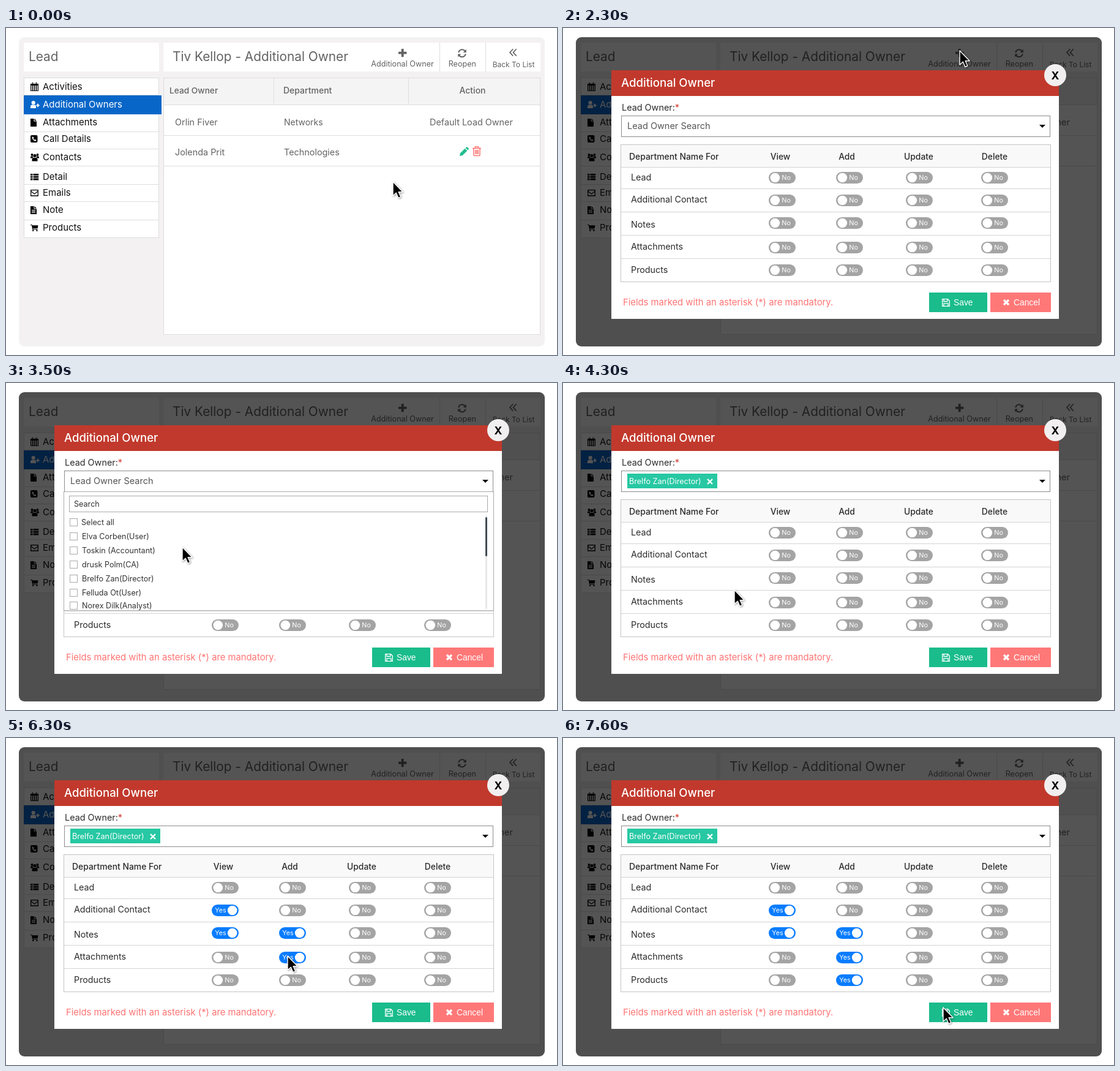
Animation, 900 px wide and 534 px high, one loop 8000 ms. Source, as an HTML page:

```html
<!DOCTYPE html>
<html lang="en">
<head>
<meta charset="utf-8">
<title>Additional owner</title>
<style>
  html, body { margin: 0; width: 100%; height: 100%; overflow: hidden; background: #fff; }
  svg { display: block; width: 100%; height: 100%; font-family: Inter, "Open Sans", sans-serif; }
</style>
</head>
<body>
<svg id="stage" viewBox="0 0 900 534"></svg>
<script>
const LOOP = 8000, STEP = 100;
const GREY = '#636363', INK = '#2b2b2b', LINE = '#dedede', GREEN = '#1abc8c', CORAL = '#ff7878';

const rect = (x, y, w, h, fill, attrs = '') =>
  `<rect x="${x}" y="${y}" width="${w}" height="${h}" fill="${fill}" ${attrs}/>`;
// A box whose one-pixel border lies inside the given bounds.
const box = (x, y, w, h, fill, stroke) =>
  rect(x + .5, y + .5, w - 1, h - 1, fill, `stroke="${stroke}"`);
const text = (x, y, str, size, fill = INK, attrs = '') =>
  `<text x="${x}" y="${y}" font-size="${size}" fill="${fill}" ${attrs}>${str}</text>`;
const centred = (x, y, str, size, fill, attrs = '') =>
  text(x, y, str, size, fill, `text-anchor="middle" ${attrs}`);
const icon = (x, y, d, fill = '#000') =>
  `<path transform="translate(${x} ${y})" d="${d}" fill="${fill}" fill-rule="evenodd"/>`;
const outline = (x, y, d, stroke = '#000', width = 1.3) =>
  `<path transform="translate(${x} ${y})" d="${d}" fill="none" stroke="${stroke}" stroke-width="${width}"/>`;
const during = (from, to, markup) => `<g data-from="${from}" data-to="${to}">${markup}</g>`;
const MEDIUM = 'font-weight="500"';

const dot = (x, y, r) => `M${x - r} ${y}a${r} ${r} 0 1 0 ${2 * r} 0a${r} ${r} 0 1 0 ${-2 * r} 0z`;
const cells = [5.2, 8, 10.8].flatMap(y => [1, 4, 7, 10].map(x => `M${x} ${y}h2v2h-2z`)).join('');
const sheet = 'M1 0H6.5V4.5H11V13H1ZM7.5 0L11 3.5H7.5Z';
const cross = 'M1 1L9 9M9 1L1 9';

// Menu entries: label, vertical centre, icon
const menu = [
  ['Activities', 96, icon(40, 89, 'M0 2H13V14H0ZM2.5 0h2v1.5h-2zM8.5 0h2v1.5h-2z' + cells)],
  ['Additional Owners', 125, icon(40, 118, dot(4.7, 4, 3.1) +
    'M0 13V10.5Q0 7.6 3 7.6H6.5Q9 7.6 9 10.5V13ZM11 5.5h1.8v2h2v1.8h-2v2H11v-2H9.3V7.5H11Z', '#fff')],
  ['Attachments', 154, icon(39, 148, sheet)],
  ['Call Details', 181, icon(40, 174, 'M2 1H9.5Q11.5 1 11.5 3V11Q11.5 13 9.5 13H2Q0 13 0 11V3Q0 1 2 1Z' +
    'M4 3.2L2.5 4.5Q3.5 9.5 8 11L9.5 9.3L7.6 7.8L6.7 8.8Q5 7.8 4.6 6.2L5.5 5.2Z')],
  ['Contacts', 211, icon(40, 204, dot(2.5, 3, 1.9) + dot(11.5, 3, 1.9) + dot(7, 4.6, 2.6) +
    'M0 8.5V7Q0 5.3 2 5.3H3.5L4.5 7.6L3 8.5ZM14 8.5V7Q14 5.3 12 5.3H10.5L9.5 7.6L11 8.5Z' +
    'M2.5 13.5V11Q2.5 8 5 8H9Q11.5 8 11.5 11V13.5Z')],
  ['Detail', 243, icon(40, 236, [2, 5.8, 9.6].map(y => `M0 ${y}h3.5v2.8H0zM4.6 ${y}h8.6v2.8H4.6z`).join(''))],
  ['Emails', 269, outline(40, 262, 'M.7 2.7H12.3V12H.7ZM.7 4.5L6.5 9L12.3 4.5')],
  ['Note', 297, icon(39, 291, sheet + 'M3 6h6v1H3zM3 8h6v1H3zM3 10h6v1H3z')],
  ['Products', 326, icon(40, 319, 'M0 2H2.5L3 3.2H12.5L11.6 8.2H4L4.2 9.2H11.5V10.3H3.3L1.8 3H0Z' +
    dot(4.2, 11.8, 1.2) + dot(10.5, 11.8, 1.2))],
];

const page = () => [
  rect(21, 15, 859, 505, '#f3f1f2', 'rx="9"'),
  rect(29, 24, 221, 47, '#fff'), rect(257, 24, 616, 47, '#fff'),
  rect(708, 24, 1, 47, LINE), rect(783, 24, 1, 47, LINE),
  text(37, 54, 'Lead', 20.8, GREY),
  text(272, 54, 'Tiv Kellop - Additional Owner', 20.8, GREY),
  icon(641, 34, 'M4.8 0h3.8v4.8H13.4v3.6H8.6V13.2H4.8V8.4H0V4.8H4.8Z', GREY),
  outline(738, 34, 'M1.2 6A6 6 0 0 1 11.7 3.4M12.8 8.4A6 6 0 0 1 2.3 11', GREY, 2),
  icon(738, 34, 'M13.8 .8V6H8.6ZM.2 13.6V8.4H5.4Z', GREY),
  outline(822, 33, 'M6.2 1.2L1 6.9L6.2 12.6M11.7 1.2L6.5 6.9L11.7 12.6', GREY, 1.6),
  centred(647.5, 63, 'Additional Owner', 12.6, GREY),
  centred(745.3, 63, 'Reopen', 12.6, GREY),
  centred(829, 64, 'Back To List', 12, GREY),

  box(29, 81, 221, 262, '#fff', LINE),
  ...[109, 169, 197, 225, 255, 283, 313].map(y => rect(29, y, 221, 1, LINE)),
  rect(29, 110, 225, 31, '#0866c9'),
  ...menu.map(([label, y, art], i) => art + text(60, y + 5, label, 15, i === 1 ? '#fff' : '#111')),

  box(257, 81, 616, 420, '#fff', LINE),
  rect(258, 82, 614, 43, '#f4f4f4'),
  ...[125, 175, 225].map(y => rect(257, y, 616, 1, LINE)),
  rect(437, 82, 1, 43, LINE), rect(657, 82, 1, 43, LINE),
  text(267, 107, 'Lead Owner', 13.7, GREY, MEDIUM),
  text(453, 107, 'Department', 14, GREY, MEDIUM),
  centred(762, 107, 'Action', 14, GREY, MEDIUM),
  text(276, 159, 'Orlin Fiver', 14.4, GREY), text(454, 159, 'Networks', 14, GREY),
  centred(760, 159, 'Default Load Owner', 14.4, GREY),
  text(276, 208, 'Jolenda Prit', 14.4, GREY), text(454, 208, 'Technologies', 14.4, GREY),
  icon(741, 194, 'M0 15L.9 10.4L8.6 2.7L12.3 6.4L4.6 14.1ZM9.5 1.8L11 .4Q11.7-.2 12.4 .4L14.6 2.6Q15.3 3.3 14.6 4.1L13.2 5.5Z', '#1fbd8d'),
  outline(762, 193, 'M0 3.4H14M4.3 3V1H9.7V3M2 3.6V14.6Q2 15.4 3 15.4H11Q12 15.4 12 14.6V3.6M4.9 6V13M7 6V13M9.1 6V13', '#ff7474', 1.5),
].join('');

const toggle = (x, y, onAt = LOOP) => {
  const pill = (fill, knob, label, labelX) => rect(x, y - 9.5, 44, 19, fill, 'rx="9.5"') +
    `<circle cx="${x + knob}" cy="${y}" r="7.8" fill="#fff"/>` +
    centred(x + labelX, y + 3.9, label, 10.8, '#fff');
  return during(0, onAt, pill('#a4a4a4', 10.3, 'No', 28.6)) +
    during(onAt, LOOP, pill('#087cff', 33.7, 'Yes', 14.5));
};

// Permission rows: label, label centre, toggle centre, switch-on time per column
const columns = [['View', 355, 336], ['Add', 463.5, 446], ['Update', 581, 560], ['Delete', 705, 683]];
const permissions = [
  ['Lead', 244, 244.5, []],
  ['Additional Contact', 280, 281.5, [4600]],
  ['Notes', 321, 318.5, [5200, 5800]],
  ['Attachments', 357, 358.5, [, 6300]],
  ['Products', 395, 395.5, [, 6800]],
];

const CHOSEN = 'Brelfo Zan(Director)';
const options = [['Select all', 228], ['Elva Corben(User)', 251], ['Toskin (Accountant)', 274],
  ['drusk Polm(CA)', 297], [CHOSEN, 320], ['Felluda Ot(User)', 343], ['Norex Dilk(Analyst)', 364]];

const dropdown = () => [
  box(94, 177, 703, 195, '#fff', '#aaa'),
  rect(95, 372, 701, 2, '#000', 'opacity=".08"'),
  box(103, 184, 684, 27, '#fff', '#aaa'),
  text(111, 202, 'Search', 12.6, '#333'),
  ...options.map(([label, y], i) =>
    box(104, y - 7, 13, 13, '#fff', '#aaa') + text(i ? 124 : 123, y + 4, label, 12.6, '#333')),
  during(3800, LOOP, rect(104, 313, 13, 13, '#087cff') + outline(104, 313, 'M3 6.5L5.5 9L10 4', '#fff', 1.6)),
  rect(783, 216, 3, 153, '#e8e8e8', 'rx="1.5"'),
  rect(783, 219, 3, 64, '#434b55', 'rx="1.5"'),
].join('');

const modal = () => [
  rect(21, 15, 859, 505, '#000', 'rx="9" opacity=".67"'),
  rect(79, 69, 731, 406, '#fff'), rect(79, 69, 731, 42, '#c1392c'),
  text(95, 96, 'Additional Owner', 18.6, '#fff', MEDIUM),
  '<circle cx="804" cy="77" r="18" fill="#f1efef"/>',
  centred(804, 83.5, 'X', 17.5, '#000', 'font-weight="700"'),
  text(96, 135, 'Lead Owner:<tspan fill="#d33b30">*</tspan>', 14.4),
  box(95, 143, 701, 35, '#fff', '#8c8c8c'),
  during(0, 3800, text(105, 165, 'Lead Owner Search', 14.5, '#555')),
  during(3800, LOOP, rect(105, 148, 147, 24, '#27c8a3') + text(108, 165, CHOSEN, 12.6, '#fff') +
    outline(235, 156, cross, '#fff', 2.4)),
  icon(778, 158, 'M0 0H10L5 5Z'),

  box(94, 190, 703, 225, '#fff', '#c4c4c4'),
  rect(95, 191, 701, 36, '#f9f9f9'),
  ...[227, 262, 300, 338, 376].map(y => rect(95, y, 701, 1, '#d4d4d4')),
  text(108, 215, 'Department Name For', 13.9, INK, MEDIUM),
  ...columns.map(([label, x]) => centred(x, 215, label, 13.8, INK, MEDIUM)),
  ...permissions.map(([label, textY, y, onTimes]) => text(111, textY + 5, label, 14.3) +
    columns.map(([, , x], i) => toggle(x, y, onTimes[i])).join('')),

  text(98, 453, 'Fields marked with an asterisk (*) are mandatory.', 14.8, '#ff7474'),
  rect(598, 432, 95, 32, GREEN), rect(698, 432, 99, 32, CORAL),
  outline(619, 442, 'M.7 .7H9.5L12.3 3.5V12.3H.7ZM3 .7V4.5H8.8V.7M3 12V7.8H10V12', '#fff'),
  outline(719, 443, cross, '#fff', 3.2),
  text(638, 453, 'Save', 13.8, '#fff', 'font-family="Liberation Sans, sans-serif"'),
  text(736, 453, 'Cancel', 13.8, '#fff', 'font-family="Liberation Sans, sans-serif"'),
  during(2700, 4300, dropdown()),
].join('');

const pointer = `<g id="pointer" stroke-linejoin="round">
  <path d="M0 0V23L5.3 18.2L8.8 26.5L12.8 24.8L9.2 16.7H16.2Z" fill="#000" stroke="#fff" stroke-width="1.4"
    style="filter: drop-shadow(1px 1px 1.5px rgba(0,0,0,.4))"/></g>`;

const stage = document.getElementById('stage');
stage.innerHTML = page() + during(2300, LOOP, modal()) + pointer;
const timed = [...stage.querySelectorAll('[data-from]')];
const pointerNode = document.getElementById('pointer');

// Pointer moves: start time, number of steps, destination
const start = [632, 251];
const moves = [
  [1000, 5, 648, 37], [2400, 3, 468, 168], [3200, 6, 198, 318], [4300, 1, 280, 338],
  [4400, 3, 352, 286], [5100, 2, 350, 316], [5600, 3, 460, 316], [6300, 1, 460, 356],
  [6800, 1, 460, 390], [7300, 4, 621, 440],
];

function pointerAt(time) {
  return moves.reduce(([x, y], [from, steps, toX, toY]) => {
    const done = Math.floor((time - from) / STEP) + 1;
    const p = Math.min(1, Math.max(0, done / steps));
    return [x + (toX - x) * p, y + (toY - y) * p];
  }, start);
}

function draw(now) {
  const time = now % LOOP;
  for (const node of timed) {
    const { from, to } = node.dataset;
    node.style.display = time >= from && time < to ? '' : 'none';
  }
  pointerNode.setAttribute('transform', `translate(${pointerAt(time)})`);
}

const began = performance.now();
function tick() {
  draw(performance.now() - began);
  requestAnimationFrame(tick);
}
tick();
</script>
</body>
</html>
```
